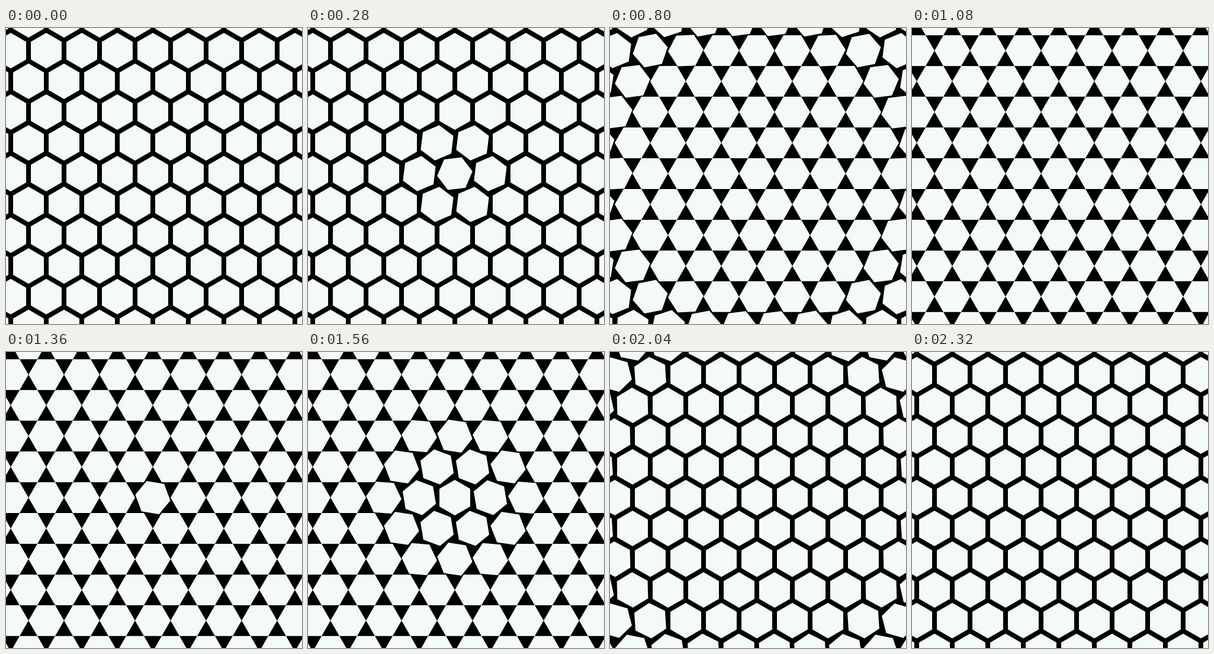
Write an HTML page with a canvas that moves like this. It is 500 px wide and 500 px high and loops after 2.36 s.

```html
<!DOCTYPE html>
<html>
<head>
<meta charset="utf-8">
<title>Turning hexagons</title>
<style>
  html, body { margin: 0; width: 100%; height: 100%; overflow: hidden; background: #000; }
  canvas { display: block; }
</style>
</head>
<body>
<canvas id="stage" width="500" height="500"></canvas>
<script>
const ctx = document.getElementById('stage').getContext('2d');

const LOOP = 2360, HALF = LOOP / 2, FRAME = 40;
const RADIUS = 30;
const STEP_X = 2 * RADIUS, STEP_Y = RADIUS * Math.sqrt(3);
const CENTER_X = 248, CENTER_Y = 246;
const DELAY_PER_PX = 2;
const TURN_START = 60, TURN_TIME = 320;

const clamp01 = x => Math.min(1, Math.max(0, x));
const smooth = x => x * x * (3 - 2 * x);

// Each half of the loop turns a tile by 30 degrees, spreading out from the center.
function tileAngle(time, distance) {
  const half = Math.floor(time / HALF);
  const local = time % HALF - TURN_START - distance * DELAY_PER_PX;
  return (half + smooth(clamp01(local / TURN_TIME))) * Math.PI / 6;
}

function hexagon(x, y, angle) {
  ctx.beginPath();
  for (let i = 0; i < 6; i++) {
    const a = angle + (i + 0.5) * Math.PI / 3;
    ctx.lineTo(x + RADIUS * Math.cos(a), y + RADIUS * Math.sin(a));
  }
  ctx.fill();
}

function draw(time) {
  ctx.fillStyle = '#000';
  ctx.fillRect(0, 0, 500, 500);
  ctx.fillStyle = '#f3faf7';
  for (let row = -5; row <= 5; row++) {
    for (let col = -5; col <= 5; col++) {
      const dx = (col + (row & 1) / 2) * STEP_X;
      const dy = row * STEP_Y;
      hexagon(CENTER_X + dx, CENTER_Y + dy, tileAngle(time, Math.hypot(dx, dy)));
    }
  }
}

const start = performance.now();
function tick() {
  const elapsed = (performance.now() - start) % LOOP;
  draw(Math.floor(elapsed / FRAME) * FRAME);
  requestAnimationFrame(tick);
}
tick();
</script>
</body>
</html>
```
